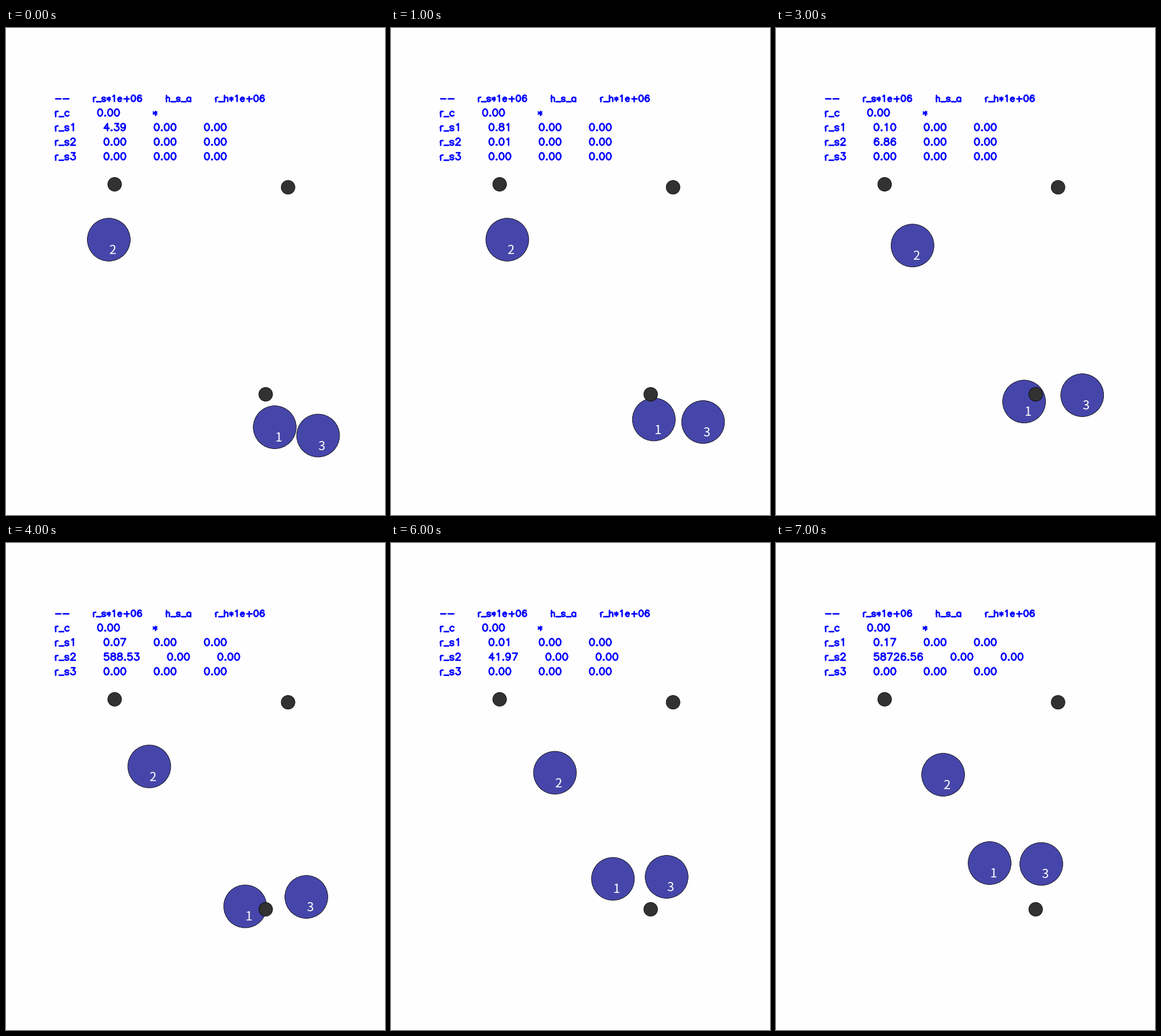
These frames come from a looping animation (660 px wide and 849 px high, 8000 ms). A matplotlib script:

```python
import numpy as np
import matplotlib.pyplot as plt
from matplotlib.animation import FuncAnimation
from matplotlib.collections import LineCollection
from matplotlib.patches import Circle

W, H, DPI = 660, 849, 64
PT = 72 / DPI  # points per pixel
BLUE, DISC, DARK = "#0000ff", "#4646aa", "#323232"


def arc(cx, cy, rx, ry, a0, a1):
    a = np.radians(np.linspace(a0, a1, 22))
    return list(zip(cx + rx * np.cos(a), cy + ry * np.sin(a)))


def oval(cx, cy, rx, ry):
    return arc(cx, cy, rx, ry, 0, 360)


# Single-stroke font: advance width and strokes, baseline at y = 0
SIX = arc(11, 10.5, 7, 10.5, 45, 180) + arc(10.5, 6.5, 6.5, 6.5, 180, -180)
BOWL = arc(9.5, 7, 6.5, 7, 40, 320)
DASH = [(4, 9), (22, 9)]
GLYPHS = {
    " ": (16, []),
    "0": (20, [oval(10, 10.5, 7, 10.5)]),
    "1": (20, [[(6, 17), (8, 18), (11, 21), (11, 0)]]),
    "2": (20, [arc(10, 15.2, 6, 5.8, 172, -35) + [(3, 0), (17, 0)]]),
    "3": (20, [[(5, 21), (16, 21), (10, 13)] + arc(10, 6.5, 7, 6.5, 90, -160)]),
    "4": (20, [[(13, 0), (13, 21), (3, 7), (18, 7)]]),
    "5": (20, [[(15, 21), (5, 21), (4, 12)] + arc(10, 7, 7, 7, 125, -155)]),
    "6": (20, [SIX]),
    "7": (20, [[(3, 21), (17, 21), (7, 0)]]),
    "8": (20, [oval(10, 16.6, 6, 4.4), oval(10, 6.1, 7, 6.1)]),
    "9": (20, [[(20 - x, 21 - y) for x, y in SIX]]),
    ".": (10, [oval(5, 1, 0.8, 0.8)]),
    "-": (26, [DASH]),
    "+": (26, [DASH, [(13, 18), (13, 0)]]),
    "*": (16, [arc(8, 9, 6, 6, a, a + 180)[::21] for a in (30, 90, 150)]),
    "_": (17, [[(1, 0), (16, 0)]]),
    "r": (13, [[(4, 14), (4, 0)], arc(11, 8, 7, 6, 180, 80)]),
    "s": (17, [arc(8.5, 10.5, 5.5, 3.5, 15, 270)
               + arc(8.5, 3.5, 5.5, 3.5, 90, -165)]),
    "h": (19, [[(4, 21), (4, 0)],
               [(4, 10)] + arc(10.5, 9.5, 4.5, 4.5, 130, 0) + [(15, 0)]]),
    "c": (18, [BOWL]),
    "a": (19, [[(15, 14), (15, 0)], BOWL]),
    "e": (18, [[(3, 8)] + arc(9, 7, 6, 7, 8, 320)]),
}


def strokes(text, x, y, scale):
    out = []
    for ch in text:
        width, lines = GLYPHS[ch]
        out += [[(x + px * scale, y - py * scale) for px, py in line]
                for line in lines]
        x += width * scale
    return out


LEFT, TOP, PITCH = 83.5, 128.1, 25.4
ROW_SCALE, HEAD_SCALE, HEAD_GAP = 0.583, 0.525, 39.1
GAP = " " * 5

header, pen = [], LEFT
for word in ("--", "r_s*1e+06", "h_s_a", "r_h*1e+06"):
    header += strokes(word, pen, TOP, HEAD_SCALE)
    pen += sum(GLYPHS[ch][0] for ch in word) * HEAD_SCALE + HEAD_GAP


def table(speeds):
    rows = ["r_c" + GAP + "0.00" + GAP + " *"]
    for i, v in enumerate(speeds, 1):
        rows.append(GAP.join([f"r_s{i}", f"{v:.2f}", "0.00", "0.00"]))
    segs = list(header)
    for i, row in enumerate(rows, 1):
        segs += strokes(row, LEFT, TOP + i * PITCH, ROW_SCALE)
    return segs


# Key times in seconds; everything between them is interpolated
TIMES = [0, 2, 4, 5, 6, 7]
PATHS = [
    [(468, 696), (447.5, 669), (416.5, 633.5),
     (405.5, 606), (386.5, 585.5), (372, 558)],
    [(179, 369), (226, 369), (249.5, 389.5),
     (263, 396), (285.5, 400.5), (291, 404)],
    [(543.5, 710.5), (543.5, 663.3), (523, 617),
     (505.5, 597), (480, 582), (462, 559.5)],
]
SPEEDS = [[4.39, 0.15, 0.07, 0.42, 0.01, 0.17],
          [0.001, 0.08, 588.53, 0.15, 41.97, 58726.56]]


def place(path, t):
    return [np.interp(t, TIMES, axis) for axis in zip(*path)]


def speed(keys, t):
    return np.exp(np.interp(t, TIMES, np.log(keys)))


fig = plt.figure(figsize=(W / DPI, H / DPI), dpi=DPI, facecolor="#fefefe")
ax = fig.add_axes([0, 0, 1, 1])
ax.set_xlim(0, W)
ax.set_ylim(H, 0)
ax.axis("off")


def disc(center, radius, color, z):
    return ax.add_patch(Circle(center, radius, fc=color, ec="black",
                               lw=0.8 * PT, zorder=z))


discs = [disc(path[0], 37.4, DISC, 2) for path in PATHS]
labels = [ax.text(0, 0, str(i + 1), color="white", family="Noto Sans CJK JP",
                  size=22 * PT, ha="left", va="baseline", zorder=3)
          for i in range(3)]
for spot in ((189.2, 272.5), (491.2, 277.7), (452.2, 638.6)):
    disc(spot, 12, DARK, 4)

text = LineCollection([], colors=BLUE, linewidths=2.6 * PT,
                      capstyle="round", joinstyle="round", zorder=5)
ax.add_collection(text, autolim=False)


def draw(t):
    for path, body, label in zip(PATHS, discs, labels):
        x, y = place(path, t)
        body.center = x, y
        label.set_position((x, y + 25))
    text.set_segments(table([speed(keys, t) for keys in SPEEDS] + [0]))
    return discs + labels + [text]


anim = FuncAnimation(fig, draw, frames=8, interval=1000, repeat=True,
                     repeat_delay=0, blit=False)
plt.show()
```
